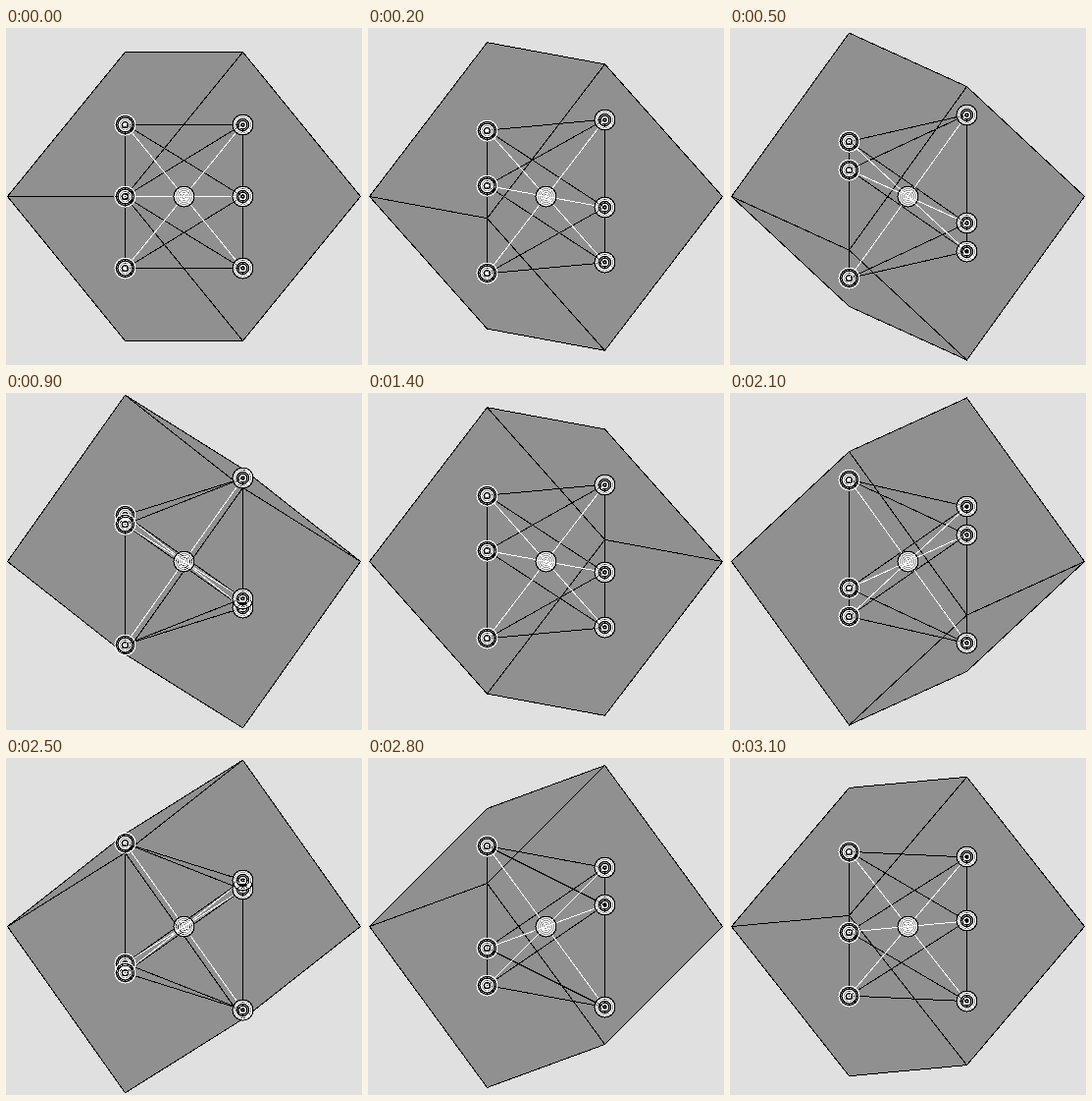
An HTML page that plays this animation: 363x343 px, repeating every 3.2 s.

```html
<!DOCTYPE html>
<html lang="en">
<head>
<meta charset="utf-8">
<title>Turning cube</title>
<style>
html, body { margin: 0; width: 100%; height: 100%; overflow: hidden; background: #e0e0e0; }
svg { display: block; width: 100%; height: 100%; shape-rendering: crispEdges; }
path, circle { fill: none; stroke: #000; stroke-width: 1; }
#faces { fill: #909090; }
.white { stroke: #fff; }
</style>
</head>
<body>
<svg viewBox="0 0 363 343">
  <path id="faces"/>
  <path id="edges"/>
  <path id="axes" class="white"/>
  <g id="nodes"></g>
</svg>
<script>
const CX = 181.5, CY = 171.5, HALF = 180;
const RING = HALF * Math.sqrt(8) / 3;
const LOOP = 3200, STEP = 100;
const $ = id => document.getElementById(id);

// The cube turns about its body diagonal, which lies along x.
const point = (x, r, deg) => {
  const a = deg * Math.PI / 180;
  return [CX + x, CY - r * Math.cos(a), -r * Math.sin(a)];
};
const xy = p => p[0].toFixed(2) + ' ' + p[1].toFixed(2);
const line = (a, b) => `M${xy(a)}L${xy(b)}`;
const polygon = pts => 'M' + pts.map(xy).join('L') + 'Z';

function rings(list) {
  const g = document.createElementNS('http://www.w3.org/2000/svg', 'g');
  for (const [r, white] of list) {
    const c = document.createElementNS(g.namespaceURI, 'circle');
    c.setAttribute('r', r);
    if (white) c.setAttribute('class', 'white');
    g.append(c);
  }
  $('nodes').append(g);
  return g;
}
const place = (g, p) =>
  g.setAttribute('transform', `translate(${Math.round(p[0] - .5) + .5} ${Math.round(p[1] - .5) + .5})`);

const radii = [10.5, 9, 7.5, 6, 4.5, 3, 1.5];
const bands = [1, 0, 0, 1, 1, 0, 1];
const nodes = [0, 1, 2, 3, 4, 5].map(i =>
  rings(radii.map((r, k) => [r, i < 3 ? bands[k] : !bands[k]])));
const hub = rings([[10.5, 0], [9, 1], [7, 1], [5, 1], [3, 1], [1, 1]]);
place(hub, [CX, CY]);

function facing(f) {
  const [a, b, , d] = f;
  return (b[0] - a[0]) * (d[1] - a[1]) - (b[1] - a[1]) * (d[0] - a[0]);
}

function draw(ms) {
  const turn = -120 * Math.floor(ms % LOOP / STEP) * STEP / LOOP;
  const tri = [0, 1, 2].map(i => 120 * i + turn);
  const tips = [point(-HALF, 0, 0), point(HALF, 0, 0)];
  const left = tri.map(a => point(-HALF / 3, RING, a + 30));
  const right = tri.map(a => point(HALF / 3, RING, a + 90));

  const faces = tri.flatMap((_, i) => {
    const j = (i + 1) % 3;
    return [
      [tips[0], left[i], right[i], left[j]],
      [tips[1], right[j], left[j], right[i]]
    ];
  });
  $('faces').setAttribute('d', faces.filter(f => facing(f) < 0).map(polygon).join(''));

  // Face centres, with opposite ones sharing an index.
  const a = tri.map(t => point(-HALF / 3, RING / 2, t + 90));
  const b = tri.map(t => point(HALF / 3, RING / 2, t + 270));
  let edges = polygon(a) + polygon(b), axes = '';
  for (let i = 0; i < 3; i++) {
    for (let j = 0; j < 3; j++) {
      if (i === j) axes += line(a[i], b[j]);
      else edges += line(a[i], b[j]);
    }
  }
  $('edges').setAttribute('d', edges);
  $('axes').setAttribute('d', axes);
  [...a, ...b].forEach((p, i) => place(nodes[i], p));
}

const start = performance.now();
function tick() {
  draw(performance.now() - start);
  requestAnimationFrame(tick);
}
draw(0);
requestAnimationFrame(tick);
</script>
</body>
</html>
```
